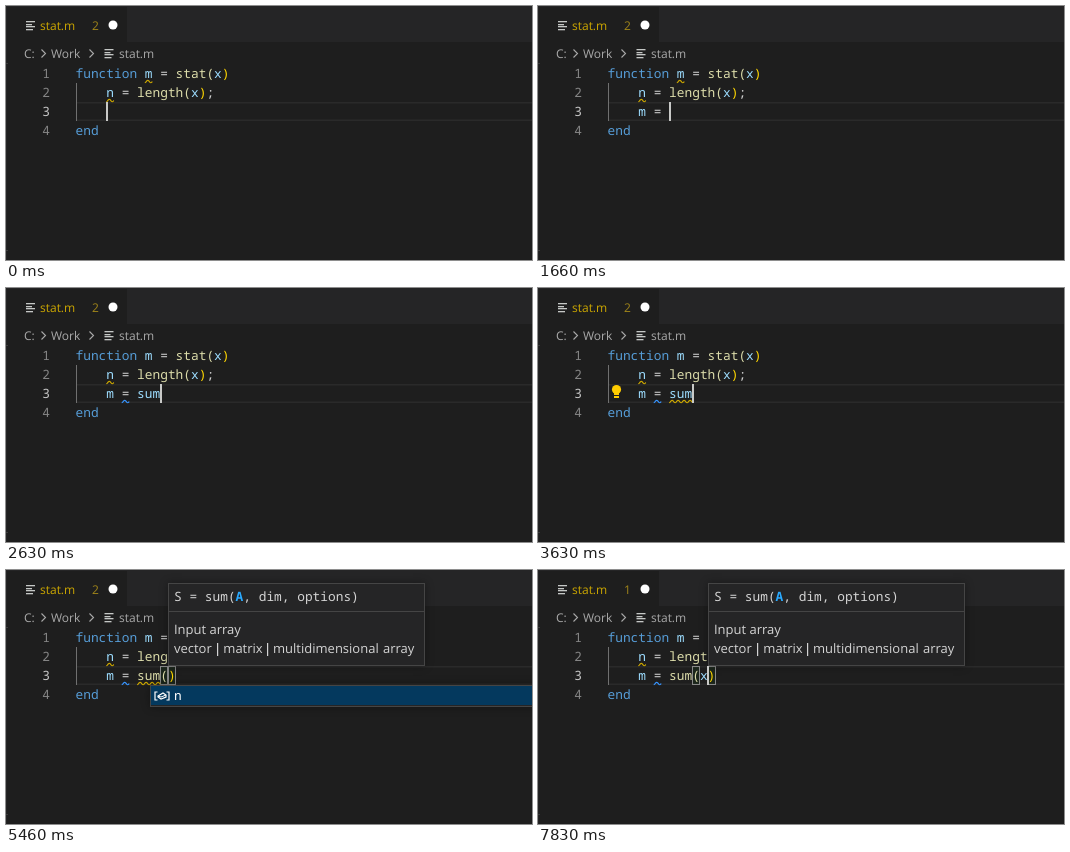
Recreate the animation shown at these times as an HTML page with a canvas. Size 526 by 254 pixels, loop 8000 ms.

```html
<!DOCTYPE html>
<html lang="en">
<head>
<meta charset="utf-8">
<title>Code editor</title>
<style>
  html, body { margin: 0; width: 100%; height: 100%; overflow: hidden; background: #1e1e1e; }
  canvas { display: block; width: 526px; height: 254px; }
</style>
</head>
<body>
<canvas id="stage" width="526" height="254"></canvas>
<script>
const ctx = document.getElementById('stage').getContext('2d', { alpha: false });
const LOOP = 8000, CHAR = 7.7, LEFT = 69.5, TOP = 58, LINE = 19;
const MONO = '12.83px "Noto Sans Mono", monospace';
const UI = '"Open Sans", sans-serif';
const C = {
  editor: '#1e1e1e', panel: '#252526', border: '#454545', text: '#d4d4d4', dim: '#a9a9a9',
  keyword: '#569cd6', func: '#dcdcaa', variable: '#9cdcfe', bracket: '#ffd700',
  warning: '#cca700', info: '#3794ff', match: '#2aaaff', method: '#b180d7', selected: '#04395e'
};

// Text left of the cursor, by time.
const keys = [
  [0, ''], [1060, 'm'], [1260, 'm '], [1460, 'm ='], [1660, 'm = '], [1900, 'm = s'],
  [2060, 'm = su'], [2630, 'm = sum'], [3960, 'm = sum('], [5830, 'm = sum(x']
];

// Suggestion lists: visible from, until, text x, typed letters, items.
const lists = [
  [1230, 1260, 131, 'm', 'm min max mfilename mod mlock magic matlabroot'],
  [2030, 2060, 162, 's', 's sprintf struct size strcmp strcmpi strncmp strsplit'],
  [2060, 2630, 162, 'su', 'su sum surf subplot sub2ind substr subs subsref'],
  [4060, 5830, 168, '', 'n']
];

const during = (t, from, to = LOOP) => t >= from && t < to;
const columnX = column => LEFT + column * CHAR;

function rect(x, y, w, h, color) {
  ctx.fillStyle = color;
  ctx.fillRect(x, y, w, h);
}

function frame(x, y, w, h, color) {
  ctx.strokeStyle = color;
  ctx.lineWidth = 1;
  ctx.strokeRect(x + .5, y + .5, w - 1, h - 1);
}

function stroke(points, color, width = 1, closed = false) {
  ctx.beginPath();
  points.forEach(([x, y]) => ctx.lineTo(x, y));
  if (closed) ctx.closePath();
  ctx.strokeStyle = color;
  ctx.lineWidth = width;
  ctx.stroke();
}

function mono(text, x, y, color, font = MONO) {
  ctx.font = font;
  ctx.fillStyle = color;
  [...text].forEach((char, i) => ctx.fillText(char, x + i * CHAR, y));
}

function label(text, x, y, color, size = 12) {
  ctx.font = `${size}px ${UI}`;
  ctx.fillStyle = color;
  ctx.fillText(text, x, y);
}

function dot(x, y, r, color) {
  ctx.beginPath();
  ctx.arc(x, y, r, 0, 2 * Math.PI);
  ctx.fillStyle = color;
  ctx.fill();
}

function panel(x, y, w, h) {
  ctx.save();
  ctx.shadowColor = 'rgba(0,0,0,.36)';
  ctx.shadowBlur = 8;
  rect(x, y, w, h, C.panel);
  ctx.restore();
  frame(x, y, w, h, C.border);
}

function fileIcon(x, y) {
  [9, 6, 9, 7].forEach((w, i) => rect(x, y + Math.round(i * 2.7), w, 1.3, '#c5c8c6'));
}

function chevron(x) {
  stroke([[x, 43.5], [x + 4, 47.5], [x, 51.5]], C.dim, 1.1);
}

function tokenColor(token) {
  if (/^(function|end)$/.test(token)) return C.keyword;
  if (/\($/.test(token)) return C.func;
  if (/^\w/.test(token)) return C.variable;
  return /[()]/.test(token) ? C.bracket : C.text;
}

function codeLine(row, text, active) {
  const y = TOP + row * LINE + 14;
  mono(String(row + 1), 36.3, y, active ? '#c6c6c6' : '#858585');
  for (const { 0: token, index } of text.matchAll(/\w+|[()]|[^\w()]+/g)) {
    const next = /^\w/.test(token) && text[index + token.length] === '(' ? '(' : '';
    mono(token, columnX(index), y, tokenColor(token + next));
  }
}

function squiggle(row, column, length, color) {
  const x = columnX(column), y = TOP + row * LINE + 17.5, points = [];
  for (let dx = 0; dx <= length * CHAR; dx += .5) {
    points.push([x + dx, y + 1.2 * Math.cos(dx * Math.PI / 3)]);
  }
  stroke(points, color, 1.2);
}

function cubeIcon(x, y, color) {
  const corner = i => [x + 6 * Math.sin(i * Math.PI / 3), y - 6.3 * Math.cos(i * Math.PI / 3)];
  stroke([0, 1, 2, 3, 4, 5].map(corner), color, 1.1, true);
  for (const i of [1, 3, 5]) stroke([[x, y], corner(i)], color, 1.1);
}

function variableIcon(x, y) {
  for (const side of [-1, 1]) {
    stroke([[x + side * 4.5, y - 4], [x + side * 7, y - 4], [x + side * 7, y + 4], [x + side * 4.5, y + 4]], '#fff', 1.2);
  }
  stroke([[x - 4, y], [x + 1, y - 3], [x + 4, y - 1], [x + 4, y + 1], [x - 1, y + 3], [x - 4, y + 1]], '#fff', 1.2, true);
  stroke([[x - 4, y], [x - 1, y + 1], [x + 4, y - 1]], '#fff');
}

function suggestions(textX, typed, items) {
  const x = Math.floor(textX - 23.5), top = 115;
  panel(x, top, 540 - x, items.length * LINE + 3);
  rect(x + 1, top + 1, 540 - x, LINE, C.selected);
  items.forEach((item, i) => {
    const y = top + 1 + i * LINE;
    if (item.length === 1 && item !== 's') variableIcon(textX - 12, y + 10);
    else cubeIcon(textX - 12, y + 9.5, i ? C.method : '#fff');
    mono(item, textX, y + 14, i ? C.text : '#fff');
    if (typed) {
      rect(textX, y + 1, typed.length * CHAR, 17, i ? C.panel : C.selected);
      mono(typed, textX, y + 14, C.match);
    }
  });
}

function signatureHint(x) {
  panel(x, 13, 257, 83);
  rect(x + 1, 41, 255, 1, C.border);
  const textX = x + 6;
  mono('S = sum( , dim, options)', textX, 31, C.text);
  mono('A', textX + 8 * CHAR, 31, C.match, 'bold ' + MONO);
  label('Input array', textX, 64, C.text, 13);
  [['vector', 0], ['matrix', 49.3], ['multidimensional', 99], ['array', 209]]
    .forEach(([word, dx]) => label(word, textX + dx, 83, C.text, 13));
  for (const dx of [43, 93]) rect(textX + dx, 73, 1.2, 13, C.text);
}

function lightBulb() {
  dot(78.5, 101.5, 4.6, '#ffcc00');
  rect(76, 104, 5, 3, '#ffcc00');
  rect(76, 108, 5, 2, '#ffcc00');
}

function chrome(problems) {
  rect(0, 0, 526, 254, C.editor);
  rect(121, 0, 405, 36, C.panel);
  rect(0, 0, 526, 1, C.panel);
  rect(0, 0, 1, 254, C.panel);
  for (const y of [57, 244]) rect(0, y, 2, 1, '#3c3c3c');

  fileIcon(20, 15);
  label('stat.m', 34, 24, C.warning);
  label(problems, 86, 24, '#a0851a');
  dot(107, 19, 4.5, '#fff');

  label('C:', 18, 52, C.dim);
  chevron(35.5);
  label('Work', 45, 52, C.dim);
  chevron(83.5);
  fileIcon(98.5, 43);
  label('stat.m', 113, 52, C.dim);
}

function draw(t) {
  const [since, typed] = keys.findLast(([time]) => t >= time);
  const called = typed.includes('(');
  const problems = during(t, 2660, 3260) || t >= 6460 ? '1' : '2';

  chrome(problems);
  rect(70, 96, 456, 1.5, '#2a2a2a');
  rect(70, 113.5, 456, 1.5, '#2a2a2a');
  rect(70, 77, 1, 38, '#707070');

  if (called) {
    for (const column of [11, typed.length + 4]) {
      const x = Math.round(columnX(column));
      rect(x, 96, 8, 19, 'rgba(0,100,0,.1)');
      frame(x, 96, 8, 19, '#888');
    }
  }
  codeLine(0, 'function m = stat(x)');
  codeLine(1, '    n = length(x);');
  codeLine(2, '    ' + typed + (called ? ')' : ''), true);
  codeLine(3, 'end');

  squiggle(1, 4, 1, C.warning);
  if (t < 2600) squiggle(0, 9, 1, C.warning);
  else squiggle(2, 6, 1, C.info);
  if (during(t, 3200, 6400)) squiggle(2, 8, 3, C.warning);
  if (during(t, 3430, 4230)) lightBulb();

  for (const [from, to, x, prefix, items] of lists) {
    if (during(t, from, to)) suggestions(x, prefix, items.split(' '));
  }
  const cursorX = Math.floor(columnX(4 + typed.length));
  if (t >= 4160) signatureHint(cursorX + 1);
  if ((t - since) % 1000 < 500) rect(cursorX, 96, 2, 19, '#c8c9c7');
}

ctx.textRendering = 'geometricPrecision';
function tick() {
  draw(performance.now() % LOOP);
  requestAnimationFrame(tick);
}
tick();
</script>
</body>
</html>
```
